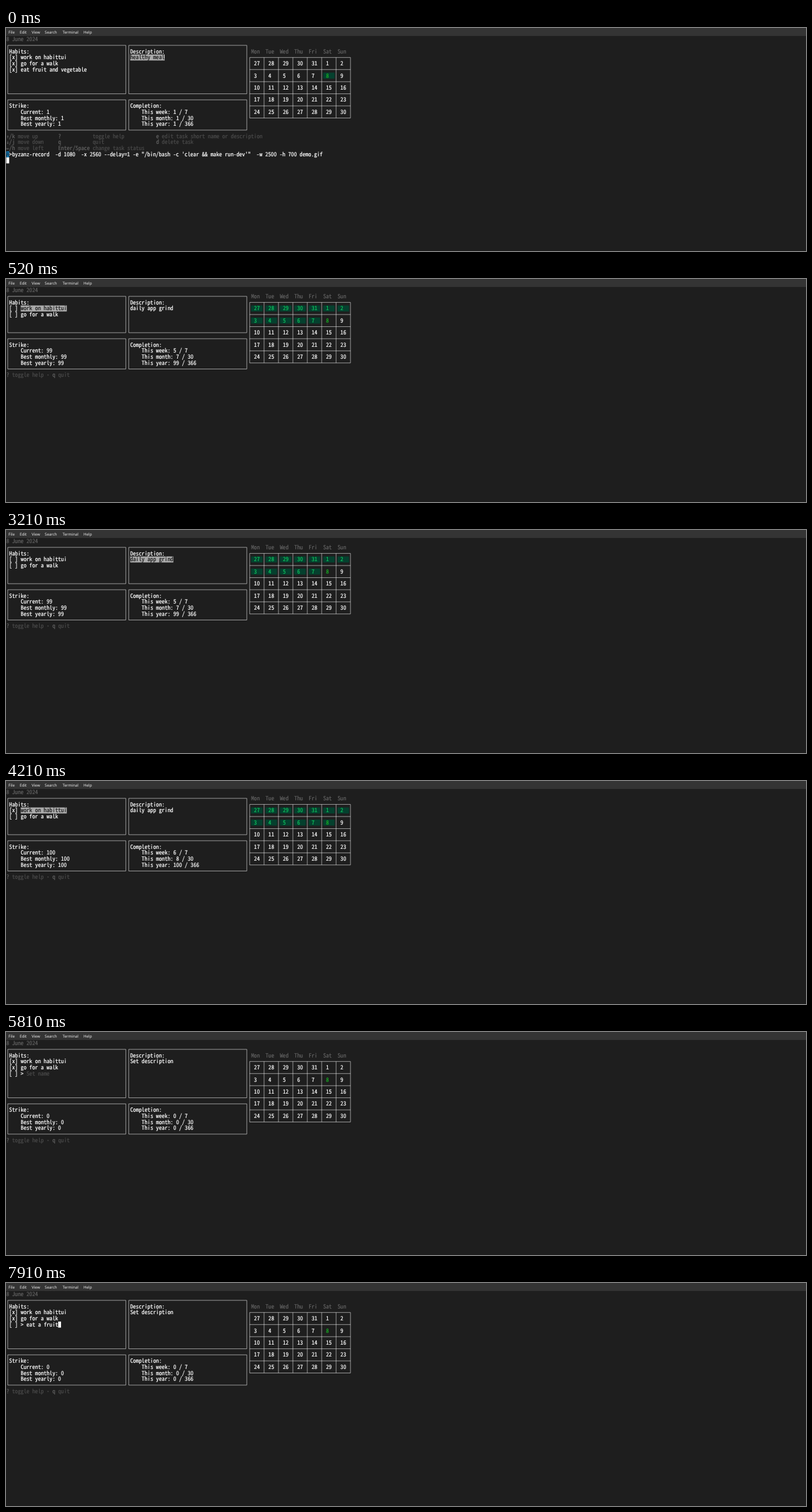
An HTML page that plays this animation: 1280 px wide and 358 px high, repeating every 8000 ms.

```html
<!DOCTYPE html>
<html lang="en">
<head>
<meta charset="utf-8">
<title>Habit tracker in a terminal</title>
<style>
  html, body { margin: 0; width: 100%; height: 100%; overflow: hidden; background: #1e1e1e; }
  svg { display: block; width: 100vw; height: 100vh; }
  text { white-space: pre; text-rendering: geometricPrecision; }
  .mono { font-family: "Noto Sans Mono CJK JP", "Noto Sans Mono", monospace; font-weight: 500; }
  .mono text { stroke-width: 0.2; }
  .symbol { font-family: "DejaVu Sans Mono", monospace; font-size: 7.65px; }
  .menu { font-family: "Noto Sans", "Open Sans", sans-serif; font-size: 6.2px; fill: #eee; }
  path { fill: none; stroke: #fff; stroke-width: 0.55; }
</style>
</head>
<body>
<svg viewBox="0 0 1280 358" preserveAspectRatio="none">
  <rect width="1280" height="358" fill="#1e1e1e"/>
  <rect width="1280" height="12.8" fill="#343434"/>
  <g id="menu"></g>
  <g id="screen" class="mono"></g>
</svg>
<script>
const LOOP = 8000;
// The terminal has 9 x 19 pixel cells, shown at 1280/2500 by 358/700.
const SCALE_X = 1280 / 2500, SCALE_Y = 358 / 700;
const CELL_W = 9 * SCALE_X, CELL_H = 19 * SCALE_Y, LEFT = SCALE_X, TOP = 26 * SCALE_Y;
const BASELINE = 8;
const WHITE = '#fff', DARK = '#1e1e1e', GREY = '#626262', DIM = '#4a4a4a', SELECTED = '#aaa';
const GREEN = '#0fc45e', TODAY_GREEN = '#18b524', DONE_BG = '#05402e';
const TODAY = 12;

const screen = document.getElementById('screen');
const colX = col => LEFT + col * CELL_W;
const rowY = row => TOP + row * CELL_H;
const lineX = col => colX(col + 0.5);
const lineY = row => rowY(row + 0.5);
const escapeText = s => s.replace(/&/g, '&amp;').replace(/</g, '&lt;');

const text = (col, row, s, fill = WHITE, cls = '') =>
  `<text class="${cls}" x="${colX(col)}" y="${rowY(row) + BASELINE}" fill="${fill}" stroke="${fill}">${escapeText(s)}</text>`;
const block = (col, row, width, fill) =>
  `<rect x="${colX(col)}" y="${rowY(row)}" width="${width * CELL_W}" height="${CELL_H}" fill="${fill}"/>`;
const cursor = (col, row) => block(col, row, 1, WHITE);
const selectable = (col, row, s, selected) => selected
  ? block(col, row, s.length, SELECTED) + text(col, row, s, DARK)
  : text(col, row, s);
const box = (c1, r1, c2, r2) =>
  `<path d="M${lineX(c1)} ${lineY(r1)}H${lineX(c2)}V${lineY(r2)}H${lineX(c1)}Z"/>`;

function calendar(row, done) {
  let out = '', grid = '';
  ['Mon', 'Tue', 'Wed', 'Thu', 'Fri', 'Sat', 'Sun'].forEach((name, i) => {
    out += text(85 + 5 * i, row, name, GREY);
  });
  for (let i = 0; i < 35; i++) {
    const col = 85 + 5 * (i % 7), r = row + 2 + 2 * Math.floor(i / 7);
    const isDone = done.includes(i);
    const fill = i === TODAY ? TODAY_GREEN : isDone ? GREEN : WHITE;
    if (isDone) out += block(col, r, 4, DONE_BG);
    out += text(col + 1, r, String(i < 5 ? 27 + i : i - 4), fill);
  }
  for (let i = 0; i <= 7; i++) grid += `M${lineX(84 + 5 * i)} ${lineY(row + 1)}V${lineY(row + 11)}`;
  for (let i = 0; i <= 5; i++) grid += `M${lineX(84)} ${lineY(row + 1 + 2 * i)}H${lineX(119)}`;
  return out + `<path d="${grid}"/>`;
}

const shortHelp = row => text(0, row, '?', GREY) + text(2, row, 'toggle help', DIM) +
  text(14, row, '•', '#3c3c3c', 'symbol') + text(16, row, 'q', GREY) + text(18, row, 'quit', DIM);

function fullHelp(row) {
  const lines = [
    ['↑', '/k', 'move up', '?', 'toggle help', 'e', 'edit task short name or description'],
    ['↓', '/j', 'move down', 'q', 'quit', 'd', 'delete task'],
    ['←', '/h', 'move left', 'Enter/Space', 'change task status', '', '']
  ];
  return lines.map(([arrow, key, move, key2, action, key3, edit], i) => {
    const r = row + i;
    return text(0, r, arrow, GREY, 'symbol') + text(1, r, key, GREY) + text(4, r, move, DIM) +
      text(18, r, key2, GREY) + text(30, r, action, DIM) +
      text(52, r, key3, GREY) + text(54, r, edit, DIM);
  }).join('');
}

// strike: current, monthly, yearly; completion: week, month, year
function app({ habits, checked, active, about, aboutSelected, done, strike, completion, typed, help = shortHelp }) {
  const adding = typed !== undefined;
  const extra = habits.length + adding > 2 ? 2 : 0;
  const lower = 8 + extra;
  let out = text(0, 0, '8 June 2024', GREY) +
    box(0, 1, 41, lower - 1) + box(42, 1, 83, lower - 1) +
    box(0, lower, 41, lower + 5) + box(42, lower, 83, lower + 5) +
    text(1, 2, 'Habits:') + text(43, 2, 'Description:');
  habits.forEach((name, i) => {
    out += text(1, 3 + i, checked.includes(i) ? '[x]' : '[ ]') +
      selectable(5, 3 + i, name, !adding && !aboutSelected && i === active);
  });
  if (adding) {
    const row = 3 + habits.length;
    out += text(1, row, '[ ] >') + (typed
      ? text(7, row, typed) + cursor(7 + typed.length, row)
      : text(7, row, 'Set name', DIM));
  }
  out += selectable(43, 3, about, aboutSelected) +
    text(1, lower + 1, 'Strike:') + text(43, lower + 1, 'Completion:');
  ['Current', 'Best monthly', 'Best yearly'].forEach((label, i) => {
    out += text(5, lower + 2 + i, `${label}: ${strike[i]}`);
  });
  [['week', 7], ['month', 30], ['year', 366]].forEach(([label, total], i) => {
    out += text(47, lower + 2 + i, `This ${label}: ${completion[i]} / ${total}`);
  });
  return out + calendar(1 + extra / 2, done) + help(14 + extra);
}

const habits = ['work on habittui', 'go for a walk'];
const work = {
  habits, checked: [], active: 0, about: 'daily app grind',
  done: Array.from({ length: TODAY }, (_, i) => i), strike: [99, 99, 99], completion: [5, 7, 99]
};
const walk = {
  habits, checked: [], active: 1, about: 'walking is relaxing and healthy activity',
  done: [0, 3, 4, 6, 7, 9, 10], strike: [0, 2, 5], completion: [3, 4, 48]
};
const fresh = {
  habits, checked: [0, 1], about: 'Set description',
  done: [], strike: [0, 0, 0], completion: [0, 0, 0]
};
const meal = {
  habits: [...habits, 'eat fruit and vegetable'], checked: [0, 1, 2], active: 2,
  about: 'healthy meal', aboutSelected: true, done: [TODAY],
  strike: [1, 1, 1], completion: [1, 1, 1], help: fullHelp
};
const command = `byzanz-record  -d 1080  -x 2560 --delay=1 -e "/bin/bash -c 'clear && make run-dev'"  -w 2500 -h 700 demo.gif`;

const shell = () => app(meal) + block(0, 19, 1, '#0b78b8') + text(0, 19, 'A', '#123a55') +
  text(1, 19, '>' + command) + cursor(0, 20);
const typing = typed => () => app({ ...fresh, typed });
const view = (base, change) => () => app({ ...base, ...change });

const steps = [
  [0, shell],
  [50, () => cursor(0, 0)],
  [520, view(work)],
  [2380, view(walk)],
  [2880, view(work)],
  [3210, view(work, { aboutSelected: true })],
  [3850, view(work)],
  [4210, view(work, {
    checked: [0], done: [...work.done, TODAY], strike: [100, 100, 100], completion: [6, 8, 100]
  })],
  [4920, view(walk, { checked: [0] })],
  [5170, view(walk, {
    checked: [0, 1], done: [...walk.done, TODAY], strike: [1, 2, 5], completion: [4, 5, 49]
  })],
  [5810, typing('')],
  [6240, typing('ea')],
  [6460, typing('eat ')],
  [7130, typing('eat a ')],
  [7480, typing('eat a fr')],
  [7740, typing('eat a frui')],
  [7910, typing('eat a fruit')]
];

document.getElementById('menu').innerHTML =
  [['File', 4], ['Edit', 22], ['View', 41], ['Search', 62], ['Terminal', 90.5], ['Help', 124]]
    .map(([label, x]) => `<text class="menu" x="${x}" y="8.6">${label}</text>`).join('');

// Choose the font size whose advance equals one terminal cell.
screen.style.fontSize = '100px';
screen.innerHTML = `<text>${'n'.repeat(20)}</text>`;
const advance = screen.firstChild.getComputedTextLength() / 2000 || 0.6;
screen.style.fontSize = CELL_W / advance + 'px';

let shown = null;
function render(ms) {
  const step = steps.filter(([start]) => start <= ms).pop();
  if (step === shown) return;
  shown = step;
  screen.innerHTML = step[1]();
}

const origin = performance.now();
function tick() {
  render((performance.now() - origin) % LOOP);
  requestAnimationFrame(tick);
}
tick();
</script>
</body>
</html>
```
